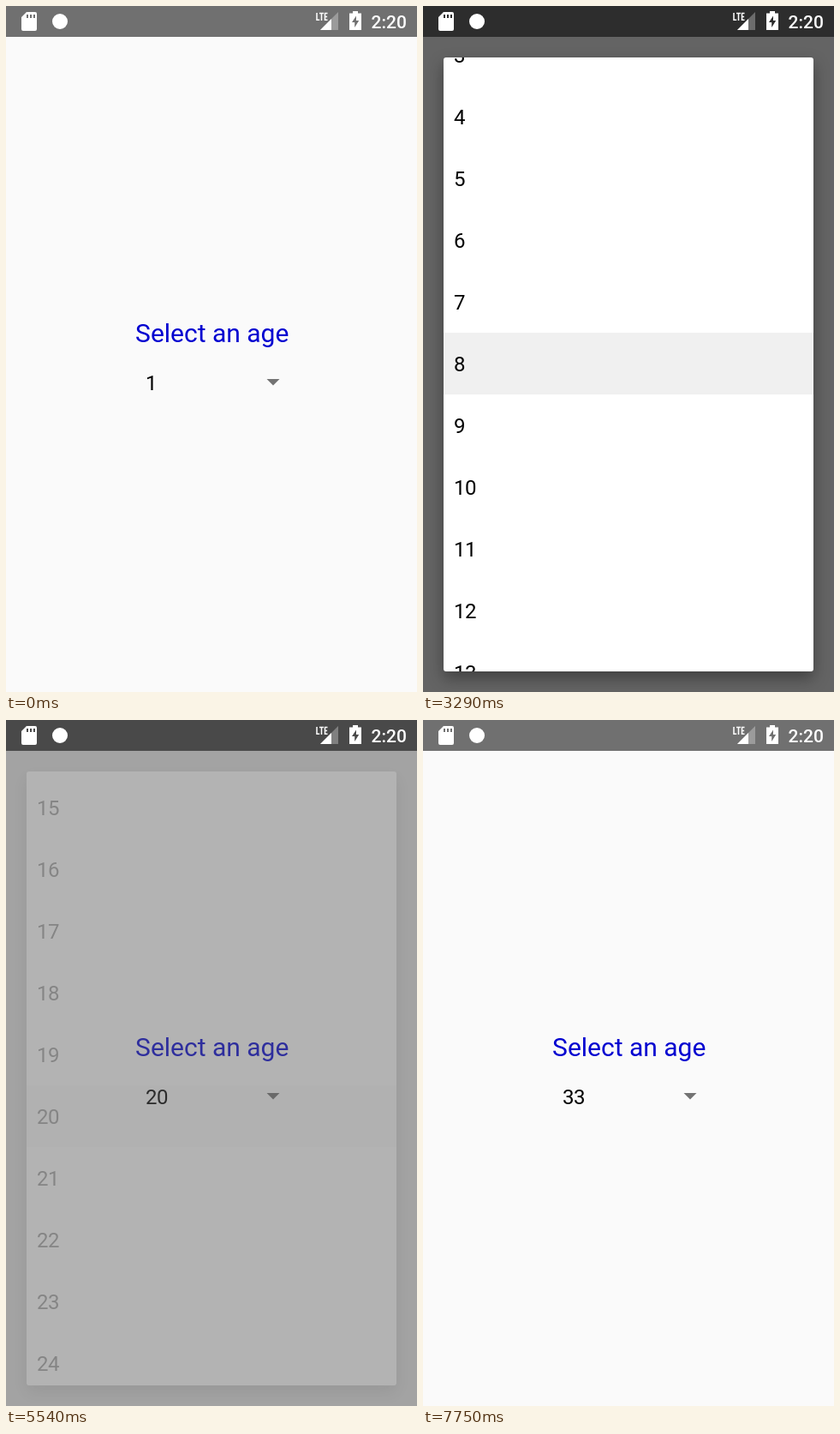
Recreate the animation shown at these times as an HTML page. Size 480x800 px, loop 8250 ms.

```html
<!DOCTYPE html>
<html lang="en">
<head>
<meta charset="utf-8">
<title>Age picker</title>
<style>
  html, body { margin: 0; width: 100%; height: 100%; overflow: hidden; background: #fafafa; }
  svg { display: block; }
  text { font-family: Roboto, "Noto Sans", sans-serif; font-size: 24px; letter-spacing: -.48px; fill: #000; }
  #title { font-size: 30px; letter-spacing: 0; fill: #0000d0; }
  #clock { font-size: 21px; letter-spacing: 0; font-weight: 500; fill: #fff; }
  #panel { filter: drop-shadow(0 8px 9px rgba(0, 0, 0, .36)); }
</style>
</head>
<body>
<svg width="480" height="800" viewBox="0 0 480 800">
  <rect width="480" height="800" fill="#fafafa"/>
  <rect width="480" height="36" fill="#707070"/>
  <text id="title" x="151.1" y="392">Select an age</text>
  <text id="value" x="163" y="448">1</text>
  <path d="M304.5 435h15l-7.5 7.5z" fill="#737373"/>
  <rect id="scrim" width="480" height="800" fill="#000" opacity="0"/>

  <g id="dialog" opacity="0">
    <rect id="panel" x="24" y="60" width="432" height="716" rx="3" fill="#fff"/>
    <svg x="24" y="60" width="432" height="716" overflow="hidden">
      <g id="list">
        <rect id="mark" width="432" height="72" fill="#f0f0f0"/>
      </g>
      <rect id="bar" x="426" width="6" height="69" fill="#000"/>
    </svg>
  </g>

  <g fill="#fff">
    <path fill-rule="evenodd" d="M24 7h10a2 2 0 0 1 2 2v18a2 2 0 0 1-2 2H20a2 2 0 0 1-2-2V13zM24 10v4h2v-4zM28 10v4h2v-4zM32 10v4h2v-4z"/>
    <circle cx="63" cy="18" r="9"/>
    <path d="M363 8v8.2h3.2M366 8.6h5M368.5 8v9M375.5 8.6h-3v7.6h3M372.5 12.4h2.6" fill="none" stroke="#fff" stroke-width="1.5"/>
    <path d="M388 7v21h-21z" opacity=".3"/>
    <path d="M380 15v13h-13z"/>
    <path fill-rule="evenodd" d="M405 6h6v2.5h4V28h-14V8.5h4zM409 11.5l-5 7.500h3.200v6l5-8h-3.200z"/>
    <text id="clock" x="426.5" y="26">2:20</text>
  </g>
</svg>
<script>
const LOOP = 8250, FPS = 24, ROW = 72, ROWS = 103;

// Times in ms, scroll positions in px
const visits = [
  { open: 1640, drag: [2460, 2590], scroll: [0, 183], fade: 2950, press: 3208, close: 3350, pick: 8 },
  { open: 4140, drag: [4590, 4790], scroll: [504, 1002], fade: 5040, press: 5250, close: 5431, pick: 20 },
  { open: 5900, drag: [6590, 6790], scroll: [1368, 1915], fade: 7090, press: 7300, close: 7480, pick: 33 }
];

const $ = id => document.getElementById(id);
const set = (id, name, value) => $(id).setAttribute(name, value);
const ramp = (t, start, length) => Math.min(1, Math.max(0, (t - start) / length));
const easeOut = p => 1 - (1 - p) ** 2;

for (let n = 1; n <= ROWS; n++) {
  const label = document.createElementNS("http://www.w3.org/2000/svg", "text");
  label.setAttribute("x", 12);
  label.setAttribute("y", (n - 1) * ROW + 45);
  label.textContent = n;
  $("list").append(label);
}

function draw(t) {
  const v = visits.findLast(item => t >= item.open);
  const picked = visits.findLast(item => t >= item.close);
  $("value").textContent = picked ? picked.pick : 1;
  if (!v) {
    set("scrim", "opacity", 0);
    set("dialog", "opacity", 0);
    return;
  }

  set("scrim", "opacity", 0.6 * ramp(t, v.open, 220) * (1 - ramp(t, v.close, 266)));
  set("dialog", "opacity", ramp(t, v.open, 130) * (1 - ramp(t, v.close, 135)));

  const [from, to] = v.scroll, [start, end] = v.drag;
  const pos = from + (to - from) * easeOut(ramp(t, start, end - start));
  set("list", "transform", `translate(0 ${-pos})`);
  set("mark", "y", (v.pick - 1) * ROW);
  set("mark", "opacity", ramp(t, v.press, 60));
  set("bar", "y", 11.4 + pos * 0.0964);
  set("bar", "opacity", 0.27 * (1 - ramp(t, v.fade, 250)));
}

const began = performance.now();
function tick(now) {
  const t = Math.max(0, now - began) % LOOP;
  draw(Math.floor(t * FPS / 1000 + 0.05) * 1000 / FPS);
  requestAnimationFrame(tick);
}
draw(0);
requestAnimationFrame(tick);
</script>
</body>
</html>
```
